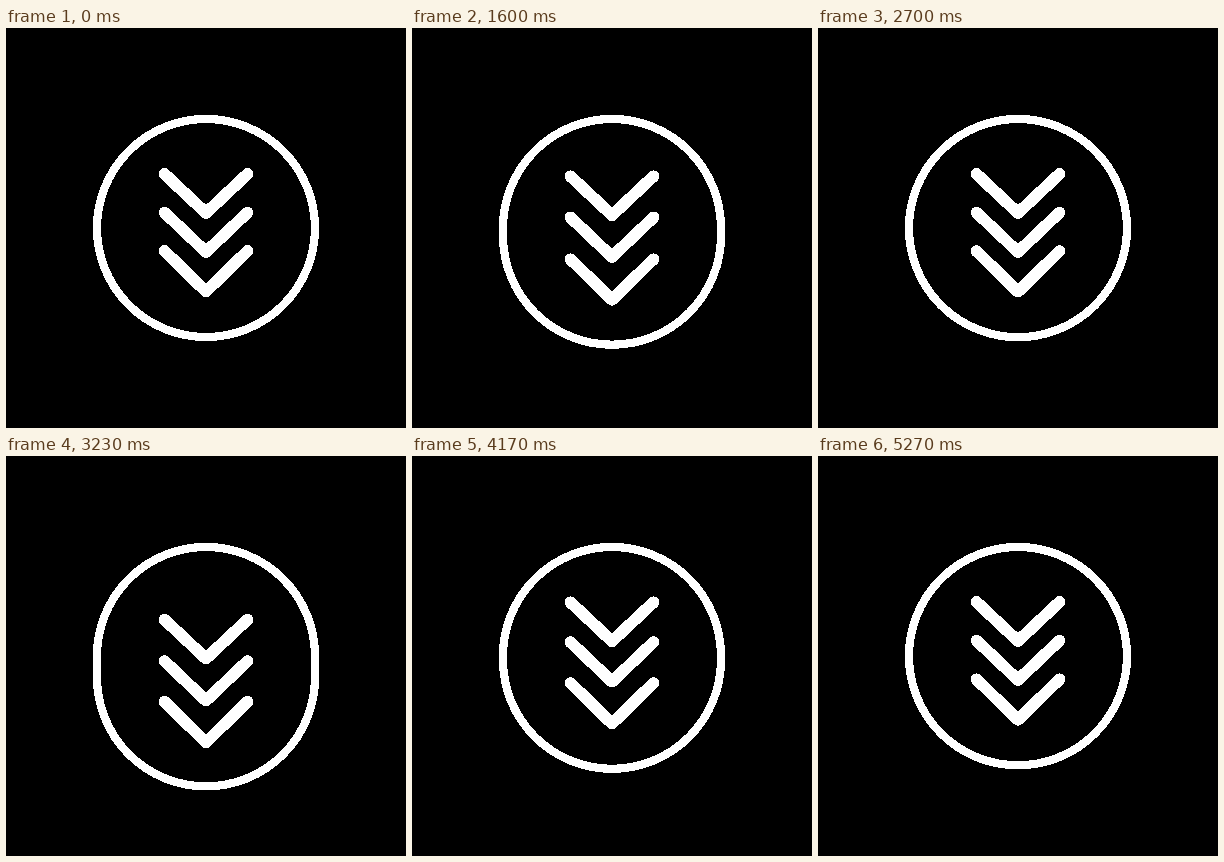
Write an HTML page that moves like this. It is 400 px wide and 400 px high and loops after 5310 ms.

```html
<!DOCTYPE html>
<html lang="en">
<head>
<meta charset="utf-8">
<title>Scroll down</title>
<style>
  html, body { margin: 0; width: 100%; height: 100%; overflow: hidden; background: #000; }
  svg { display: block; width: 100%; height: 100%; }
  g { fill: none; stroke: #fff; stroke-linecap: round; stroke-linejoin: round; shape-rendering: crispEdges; }
</style>
</head>
<body>
<svg viewBox="0 0 400 400">
  <g>
    <rect id="ring" x="91" y="91" width="218" height="218" rx="109" stroke-width="8.2"/>
    <path class="chevron" d="M158.5 146 L200 185 L241.5 146" stroke-width="11.8"/>
    <path class="chevron" d="M158.5 184.5 L200 224 L241.5 184.5" stroke-width="11.8"/>
    <path class="chevron" d="M158.5 223 L200 263.5 L241.5 223" stroke-width="11.8"/>
  </g>
</svg>
<script>
  const LOOP = 5310;
  const CYCLE = LOOP / 4;
  const LAG = 9;
  const STAGGER = 0.05;
  const STRETCH = 22.5;
  const DROP = 24;

  const ring = document.getElementById('ring');
  const chevrons = [...document.querySelectorAll('.chevron')];

  const ease = (p) => (1 - Math.cos(Math.PI * Math.min(1, Math.max(0, p)))) / 2;

  // Later starters peak later and return faster, so all meet halfway back.
  function dip(phase, delay) {
    const peak = 0.5 + delay;
    return phase < peak
      ? ease((phase - delay) / 0.5)
      : 1 - ease((phase - peak) / (0.5 - 2 * delay));
  }

  function draw(time) {
    const phase = ((time + CYCLE - LAG) % CYCLE) / CYCLE;
    ring.setAttribute('height', 218 + STRETCH * dip(phase, 0));
    chevrons.forEach((chevron, i) => {
      const y = DROP * dip(phase, STAGGER * (2 - i));
      chevron.setAttribute('transform', `translate(0 ${y})`);
    });
  }

  const start = performance.now();
  function tick() {
    draw(performance.now() - start);
    requestAnimationFrame(tick);
  }
  tick();
</script>
</body>
</html>
```
